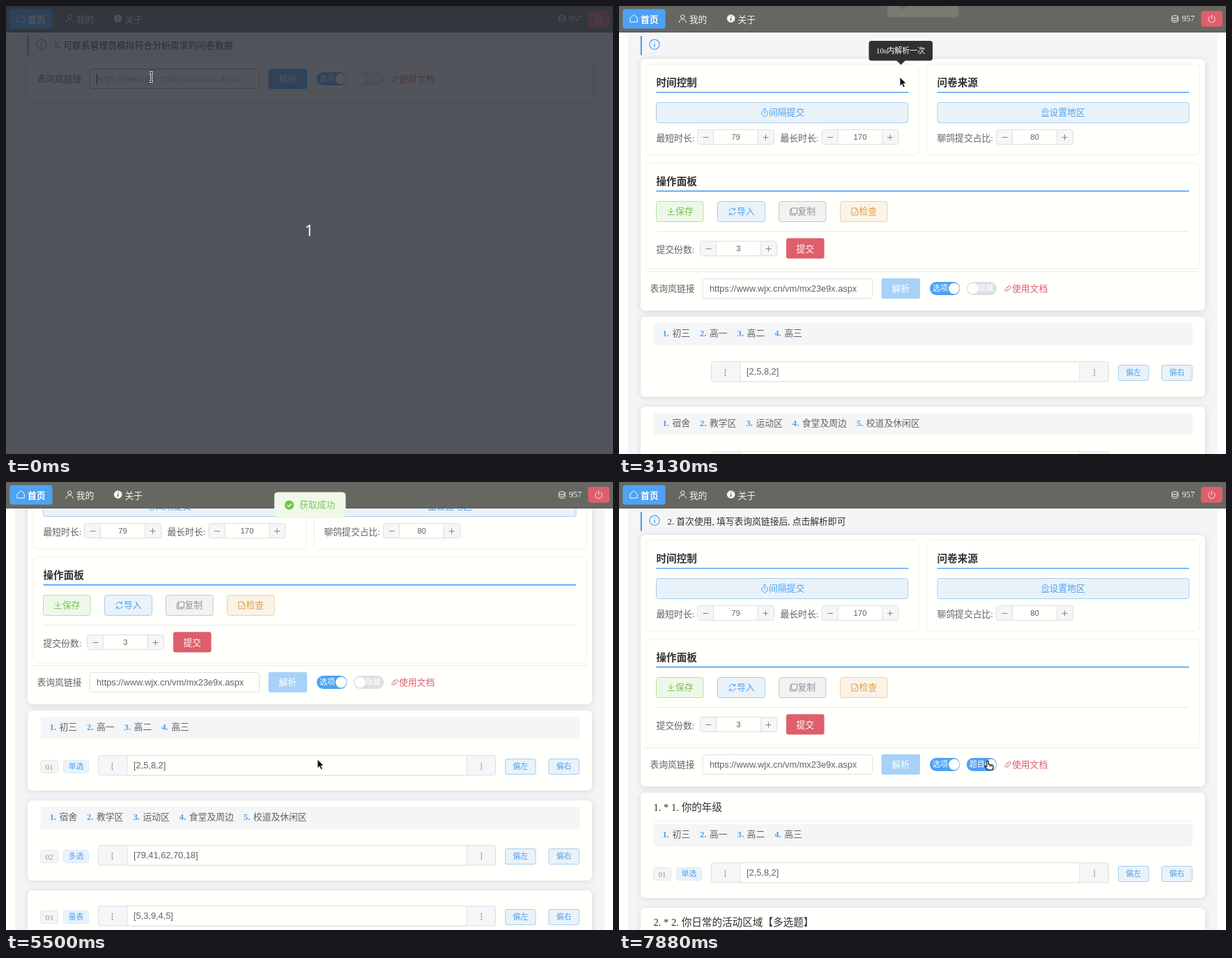
An HTML page that plays this animation: 871x643 px, repeating every 8 s.

```html
<!DOCTYPE html>
<html lang="zh-CN">
<head>
<meta charset="utf-8">
<title>问卷</title>
<style>
html, body { margin: 0; width: 100%; height: 100%; overflow: hidden; background: #fffffc; }
svg { display: block; width: 871px; height: 643px; }
text { font: 12.8px "Liberation Serif", "Noto Sans CJK SC", "Noto Sans CJK", serif; white-space: pre; }
.sans { font-family: "Liberation Sans", Arial, sans-serif; }
.small { font-size: 11px; }
.num { font-size: 11.3px; }
.head { font-size: 14.6px; }
.bold { font-weight: bold; }
.mid { text-anchor: middle; }
.count { font: 22px "Noto Sans", "Open Sans", sans-serif; }
.icon { fill: none; stroke-width: 1; stroke-linejoin: round; stroke-linecap: round; }
.card { filter: drop-shadow(0 1px 5px rgba(0, 0, 0, .12)); }
.panel { filter: drop-shadow(0 0 2px rgba(0, 0, 0, .1)); }
</style>
</head>
<body>
<svg id="stage" viewBox="0 0 871 643" xmlns="http://www.w3.org/2000/svg"></svg>
<script>
const PAPER = '#fffffc', GREY = '#f4f5f6', BLUE = '#4fa2f3', RED = '#de5f6b', INK = '#303133', BODY = '#606266', LINE = '#dcdfe3';
const SOFT = '#eaf2f9', EDGE = '#a5cdf0', DIM = '#909399';
const $ = id => document.getElementById(id);

// ---------- drawing helpers ----------
const rect = (x, y, w, h, fill, { r = 0, stroke = 'none', cls = '', id = '' } = {}) =>
  `<rect x="${x}" y="${y}" width="${w}" height="${h}" rx="${r}" fill="${fill}" stroke="${stroke}" class="${cls}"${id && ` id="${id}"`}/>`;
// Text centred on cy, with its baseline on a whole pixel.
const text = (x, cy, s, fill = BODY, cls = '', id = '') => {
  const size = /head/.test(cls) ? 14.6 : /small|num/.test(cls) ? 11 : 12.8;
  return `<text x="${x}" y="${Math.round(cy + size * .37)}" fill="${fill}" class="${cls}"${id && ` id="${id}"`}>${s}</text>`;
};
const line = (x1, x2, y, color = '#e9ebee', w = 1) =>
  `<path d="M${x1} ${y}H${x2}" stroke="${color}" stroke-width="${w}"/>`;
const group = (id, body) => `<g id="${id}">${body}</g>`;

const ICONS = {
  home: 'M-5 -1L0 -5.5L5 -1V5H-5Z',
  user: 'M-2.7 -2.6a2.7 2.7 0 1 0 5.4 0a2.7 2.7 0 1 0 -5.4 0M-5 5.5a5 4.6 0 0 1 10 0',
  coins: 'M-4.4 -2.6a4.4 2 0 1 0 8.8 0a4.4 2 0 1 0 -8.8 0V3a4.4 2 0 0 0 8.8 0V-2.6M-4.4 .2a4.4 2 0 0 0 8.8 0',
  power: 'M-2.8 -3.6a4.8 4.8 0 1 0 5.6 0M0 -5.5V-.5',
  timer: 'M-4.4 1a4.4 4.4 0 1 0 8.8 0a4.4 4.4 0 1 0 -8.8 0M-1.8 -5.4H1.8M0 -1.2V1.5',
  place: 'M0 4.4L-3.1 1.6A4.3 4.3 0 1 1 3.1 1.6ZM-1.6 -1.4a1.6 1.6 0 1 0 3.2 0a1.6 1.6 0 1 0 -3.2 0M-3.4 3.2L-5 5.4H5L3.4 3.2',
  save: 'M0 -5V2M-3.6 -1.6L0 2L3.6 -1.6M-4.8 4.6H4.8',
  sync: 'M-4.6 -1a4.7 4.7 0 0 1 8.5 -1.6M4 -5.2V-2.5H1.4M4.6 1a4.7 4.7 0 0 1 -8.5 1.6M-4 5.2V2.5H-1.4',
  copy: 'M-2.6 -5H5V3H-2.6ZM-2.6 -3H-5V5H3V3',
  check: 'M-4.2 -5H1.5L4.2 -2.4V5H-4.2ZM1.5 -5V-2.4H4.2M-2 1L-.4 2.6L2.2 -.4',
  link: 'M-1.2 -1.2L1 -3.4A1.9 1.9 0 0 1 3.7 -.7L1.5 1.5A1.9 1.9 0 0 1 -.6 1.7M1.2 1.2L-1 3.4A1.9 1.9 0 0 1 -3.7 .7L-1.5 -1.5A1.9 1.9 0 0 1 .6 -1.7'
};
const icon = (name, x, y, color) =>
  `<path class="icon" d="${ICONS[name]}" transform="translate(${x} ${y})" stroke="${color}"/>`;

const button = (x, y, w, h, fill, stroke, color, label, tx, glyph, gx) =>
  rect(x, y, w, h, fill, { r: 3, stroke }) + icon(glyph, gx, y + h / 2, color) + text(tx, y + h / 2 - .3, label, color);

const stepper = (x, y, value) => {
  const cy = y + 10.5, ink = '#808388';
  return rect(x, y, 110, 21, '#f5f6f7', { r: 3, stroke: LINE }) + rect(x + 23, y, 64, 21, PAPER, { stroke: LINE }) +
    line(x + 8, x + 16, cy + .5, ink) + line(x + 94, x + 102, cy + .5, ink) +
    `<path d="M${x + 98} ${cy - 3.5}V${cy + 4.5}" stroke="${ink}"/>` + text(x + 55, cy, value, BODY, 'sans num mid');
};

const toggle = (id, x, on, off) => group(id,
  rect(x, 95, 43.2, 19, LINE, { r: 9.5 }) + rect(x, 95, 43.2, 19, BLUE, { r: 9.5, id: id + 'Fill' }) +
  text(x + 4, 104, on, '#fff', 'small', id + 'On') + text(x + 17, 104, off, '#fff', 'small', id + 'Off') +
  `<circle id="${id}Knob" cy="104.5" r="7.8" fill="${PAPER}"/>`);

// ---------- page parts ----------
const panels = () => {
  const panel = (x, y, w, h, title, rule) => rect(x, y, w, h, PAPER, { r: 6, cls: 'panel' }) +
    text(x + 13.5, y + 25, title, INK, 'head bold') + line(x + 13.5, x + w - 14, rule, BLUE, 1.6);
  return panel(40, 84.5, 389.5, 128.5, '时间控制', 124) + panel(443, 84.5, 389, 128.5, '问卷来源', 124) +
    panel(40, 226.5, 792, 150, '操作面板', 265.6) +
    button(53.5, 138.5, 361, 29, SOFT, EDGE, BLUE, '间隔提交', 215, 'timer', 209) +
    button(457, 138.5, 361, 29, SOFT, EDGE, BLUE, '设置地区', 617.5, 'place', 611.5) +
    text(53.5, 189, '最短时长:') + stepper(112.5, 177.5, 79) +
    text(231.5, 189, '最长时长:') + stepper(291, 177.5, 170) +
    text(456.5, 189, '聊鸽提交占比:') + stepper(541.5, 177.5, 80) +
    button(53.5, 280.5, 67.5, 29, '#eef8e9', '#b8e0a4', '#74c44f', '保存', 81, 'save', 74.5) +
    button(141.5, 280.5, 68, 29, SOFT, EDGE, BLUE, '导入', 169, 'sync', 162.5) +
    button(229.5, 280.5, 67.5, 29, '#f1f2f2', '#c6c8cb', DIM, '复制', 256.5, 'copy', 250.5) +
    button(317.5, 280.5, 67.5, 29, '#faf3e7', '#eed0a0', '#dc9f48', '检查', 344.5, 'check', 338.5) +
    line(53.5, 818, 323.5) + text(53.5, 349, '提交份数:') + stepper(116.5, 337.5, 3) +
    rect(240, 333.3, 54.5, 29.2, RED, { r: 3 }) + text(267.2, 348, '提交', '#fff', 'mid');
};

const urlRow = () => line(36, 836, 80.5) + text(44.5, 104, '表询岚链接') +
  rect(120, 90.5, 243.5, 28, PAPER, { r: 3, stroke: LINE, id: 'field' }) +
  text(130, 104, 'https://www.wjx.cn/vm/xxxxxxx.aspx', '#a8abb2', 'sans', 'hint') +
  '<path id="caret" d="M130.5 97V112" stroke="#222"/>' +
  text(130, 104, 'https://www.wjx.cn/vm/mx23e9x.aspx', BODY, 'sans', 'url') +
  rect(376.5, 89.8, 55.5, 29.2, BLUE, { r: 3, id: 'parse' }) + text(404.2, 104, '解析', '#fff', 'mid') +
  toggle('opt', 446, '选项', '隐藏') + toggle('ttl', 498.8, '题目', '隐藏') +
  icon('link', 558, 104.5, RED) + text(564, 104, '使用文档', RED);

const QUESTIONS = [
  { kind: '单选', value: '[2,5,8,2]', title: '1. * 1. 你的年级', options: ['初三', '高一', '高二', '高三'] },
  { kind: '多选', value: '[79,41,62,70,18]', title: '2. * 2. 你日常的活动区域【多选题】', options: ['宿舍', '教学区', '运动区', '食堂及周边', '校道及休闲区'] },
  { kind: '量表', value: '[5,3,9,4,5]' },
  { kind: '量表', value: '[5,7,9,4,2]' }
];

const optionBar = options => {
  let x = 62.4;
  return rect(49.5, 9, 773.5, 32, GREY, { r: 4 }) + options.map((name, i) => {
    const s = text(x, 23.4, i + 1 + '.', BLUE, 'bold') + text(x + 14, 23.4, name);
    x += 28 + name.length * 12.8;
    return s;
  }).join('');
};

const sideButton = (x, label) => rect(x, 5.5, 43.5, 22, SOFT, { r: 2.5, stroke: EDGE }) + text(x + 21.8, 16.2, label, BLUE, 'small mid');

const question = (q, i) => group('q' + i,
  rect(31, 0, 810, 73, PAPER, { r: 7, cls: 'card', id: 'card' + i }) +
  (q.options ? group('title' + i, text(49.5, 20.5, q.title, INK, 'head') + line(49.5, 823, 40.5)) + group('bar' + i, optionBar(q.options)) : '') +
  group('row' + i,
    `<g class="tags">${rect(49.5, 7.5, 25, 18, '#f3f4f4', { r: 3, stroke: '#e6e7e9' })}${text(62, 16.5, '0' + (i + 1), DIM, 'small mid')}` +
    `${rect(82.5, 7.5, 36, 18, '#eaf3fb', { r: 3, stroke: '#d9eafa' })}${text(100.5, 15.7, q.kind, BLUE, 'small mid')}</g>` +
    rect(132.5, .5, 570, 28.5, '#f5f6f7', { r: 3, stroke: LINE }) + rect(174, .5, 487, 28.5, PAPER, { stroke: LINE }) +
    text(152.5, 14.7, '[', DIM, 'sans small mid') + text(682, 14.7, ']', DIM, 'sans small mid') +
    text(183, 14.5, q.value, BODY, 'sans') + sideButton(716.5, '偏左') + sideButton(778.8, '偏右')));

const header = () => rect(0, 0, 871, 37.5, '#676762') + line(0, 871, 37.5, '#55554f') +
  rect(5.3, 4.4, 61.3, 28, BLUE, { r: 4 }) + icon('home', 21.3, 18, '#fff') + text(31, 19.2, '首页', '#fff', 'bold') +
  icon('user', 91.3, 18, '#f4f4f0') + text(100.8, 19.2, '我的', '#f4f4f0') +
  '<circle cx="160.7" cy="18" r="5.8" fill="#f4f4f0"/><path d="M160.9 17.2L160.3 21M161.3 14.3V15.2" stroke="#676762" stroke-width="1.6"/>' +
  text(170.5, 19.2, '关于', '#f4f4f0') + icon('coins', 797.8, 18.3, '#f4f4f0') +
  '<text x="807.7" y="22" fill="#f4f4f0" style="font-size:12.2px">957</text>' +
  rect(835.2, 7, 30.8, 22.8, RED, { r: 4 }) + icon('power', 850.5, 18.5, '#f8e8e8');

const tip = () => `<g id="tip">${rect(358.5, 50, 91.5, 28.5, INK, { r: 4 })}<path d="M398 78L404.5 84.5L411 78Z" fill="${INK}"/>` +
  text(404.2, 64, '10s内解析一次', '#fff', 'small mid') + '</g>';

const toast = () => group('toast', rect(385.5, 15, 101.5, 36, '#f0f8ea', { r: 4, stroke: '#e3f2da' }) +
  '<circle cx="406.5" cy="33" r="6.6" fill="#6cc44b"/><path d="M403.5 33L405.7 35.2L409.6 31.2" fill="none" stroke="#fff" stroke-width="1.3"/>' +
  text(421, 32.5, '获取成功', '#7cc95a'));

const cursors = () => {
  const beam = 'M-2.5 -6.5H2.5M0 -6.5V6.5M-2.5 6.5H2.5';
  return group('beam', `<path d="${beam}" stroke="#fff" stroke-width="3"/><path d="${beam}" stroke="#111" stroke-width="1.2"/>`) +
    group('arrow', '<path d="M0 0V13L3 10.2L5 15L7.4 14L5.3 9.3H9.3Z" fill="#111" stroke="#fff" stroke-width=".9"/>') +
    group('hand', '<path d="M-1.2 1Q0 -.6 1.2 1V5L7 6.4Q8.4 7 8 9L7 13H0L-4 8.5Q-3.6 6.6 -1.2 8.4Z" fill="#fff" stroke="#111" stroke-width="1.2"/><path d="M3 6V8.5M5.3 6.4V8.7" stroke="#111"/>') +
    group('ban', '<circle r="5.2" fill="#fff" stroke="#fff" stroke-width="3.4"/><circle r="4.7" fill="#ddd" stroke="#111" stroke-width="2.2"/><path d="M-3 3L3 -3" stroke="#111" stroke-width="2.4"/>');
};

$('stage').innerHTML = rect(0, 0, 871, 643, PAPER) + rect(12.5, 37, 846.5, 606, GREY) +
  group('page',
    rect(30.8, 43, 2.2, 27.5, '#559ee4') +
    `<circle cx="51" cy="55.2" r="7" fill="none" stroke="${BLUE}" stroke-width="1.3"/><path d="M51 54.2V59M51 51.3V52.6" stroke="${BLUE}" stroke-width="1.4"/>` +
    text(69.5, 56.2, '', INK, '', 'notice') +
    rect(31, 76, 810, 60, PAPER, { r: 7, cls: 'card', id: 'mainCard' }) +
    group('panels', panels()) + group('urlRow', urlRow()) +
    group('list', QUESTIONS.map(question).join('')) + tip()) +
  header() + toast() +
  group('shade', rect(0, 0, 871, 643, 'rgba(38,43,52,.8)') + '<text class="count mid" x="435" y="330" fill="#fff">1</text>') +
  group('cursor', cursors());

// ---------- timeline ----------
const LOOP = 8000, STEP = 125, LOADED = 3100;
const NOTICES = ['5. 可联系管理员模拟符合分析需求的问卷数据', '1. 建议电脑端打开本站点', '2. 首次使用, 填写表询岚链接后, 点击解析即可'];

// Linear value at t from [time, value] pairs.
const at = (t, keys) => {
  const i = keys.findIndex(k => k[0] > t);
  if (i < 0) return keys[keys.length - 1][1];
  if (!i) return keys[0][1];
  const [t0, a] = keys[i - 1], [t1, b] = keys[i];
  return a + (b - a) * (t - t0) / (t1 - t0);
};
const smooth = p => p * p * (3 - 2 * p);
const move = (id, x, y) => $(id).setAttribute('transform', `translate(${x} ${y})`);
const fade = (id, o) => { $(id).style.opacity = o; };
const show = (id, on) => { $(id).style.display = on ? '' : 'none'; };
const set = (id, name, v) => $(id).setAttribute(name, v);

const setToggle = (id, x, p) => {
  fade(id + 'Fill', p);
  show(id + 'On', p > .5);
  show(id + 'Off', p <= .5);
  set(id + 'Knob', 'cx', x + 9.2 + 25.6 * p);
};

const SCROLL = [[4400, 0], [4500, 2], [4625, 9], [4750, 78], [4875, 158], [5000, 221], [5125, 232], [5250, 226], [5375, 182], [5500, 118], [5625, 60], [5750, 20], [5875, 4], [6000, 0]];
const MOUSE_X = [[1200, 208.5], [1625, 355], [1900, 403], [3450, 403], [4230, 426], [4700, 426], [5000, 443], [5900, 450], [6130, 450], [6250, 459], [7200, 459], [7500, 529]];
const MOUSE_Y = [[3450, 102], [4230, 393], [4900, 393], [5000, 392], [5300, 394], [5900, 406], [6130, 406], [6250, 411], [7200, 411], [7500, 400]];

const pointer = (t, x) =>
  t < 2700 ? (x < 363 ? 'beam' : x < 377 ? 'arrow' : 'hand') :
  t < LOADED ? 'ban' : t < 4200 ? 'arrow' : t < 4800 ? 'ban' : t < 6200 ? 'arrow' : 'hand';

function draw(t) {
  const loaded = t >= LOADED, clicked = t >= 2600;
  show('shade', t < 500);
  move('page', 0, -at(t, SCROLL));

  $('notice').textContent = NOTICES[t < 3000 ? 0 : t < 7400 ? 1 : 2];
  fade('notice', at(t, [[2580, 1], [2900, 0], [3450, 0], [3750, 1], [6950, 1], [7250, 0], [7650, 0], [7860, 1]]));

  set('mainCard', 'height', loaded ? 361 : 60);
  show('panels', loaded);
  move('urlRow', 0, loaded ? 301 : 0);
  show('hint', t < 875);
  show('caret', t < 875);
  show('url', t >= 875);
  set('field', 'stroke', clicked ? LINE : BLUE);
  set('parse', 'fill', clicked ? '#a7d1f7' : BLUE);
  setToggle('opt', 446, at(t, [[6470, 1], [6720, 0], [6960, 0], [7220, 1]]));
  setToggle('ttl', 498.8, at(t, [[7690, 0], [7870, 1]]));

  const options = t < 6500 || t >= 7000, titles = t >= 7750;
  let y = 446.4;
  show('list', loaded);
  QUESTIONS.forEach((q, i) => {
    const up = q.options && titles ? 36 : 0, mid = q.options && options ? 42 : 0;
    move('q' + i, 0, Math.round(y));
    set('card' + i, 'height', 73 + up + mid);
    move('row' + i, 0, 22 + up + mid);
    if (q.options) {
      show('title' + i, titles);
      show('bar' + i, options);
      move('bar' + i, 0, up);
    }
    y += 86.7 + up + mid;
  });
  const tags = at(t, [[3130, 0], [3400, 1]]);
  document.querySelectorAll('.tags').forEach(g => { g.style.opacity = tags; });

  fade('tip', at(t, [[1800, 0], [2000, 1], [3550, 1], [3800, 0], [4120, 0], [4250, 1], [4920, 1], [5130, 0]]));
  move('tip', 0, t < 4000 ? 0 : 302);

  const shown = at(t, [[3070, 0], [3480, 1], [5975, 1], [6250, 0]]);
  move('toast', 0, -37 * (1 - smooth(shown)));
  fade('toast', shown);

  const x = at(t, MOUSE_X), kind = pointer(t, x);
  move('cursor', x, at(t, MOUSE_Y));
  ['beam', 'arrow', 'hand', 'ban'].forEach(k => show(k, k === kind));
}

function tick() {
  draw(Math.floor(performance.now() % LOOP / STEP) * STEP);
  requestAnimationFrame(tick);
}
tick();
</script>
</body>
</html>
```
